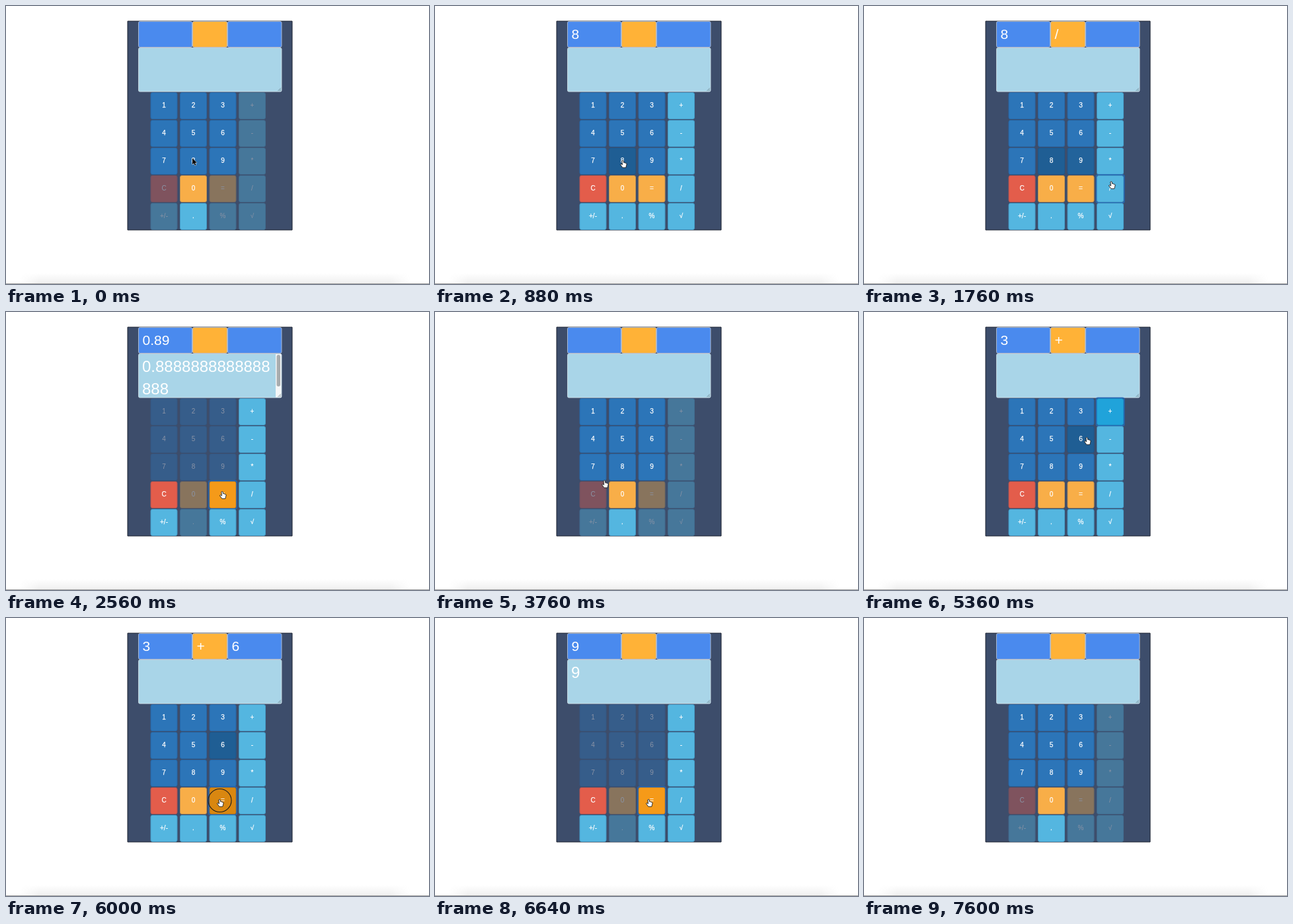
Recreate the animation shown at these times as an HTML page with a canvas. Size 640 px wide and 422 px high, loop 7680 ms.

```html
<!DOCTYPE html>
<html lang="en">
<head>
<meta charset="utf-8">
<title>Calculator</title>
<style>
html, body { margin: 0; width: 100%; height: 100%; overflow: hidden; background: #fff; }
canvas { display: block; width: 640px; height: 422px; }
</style>
</head>
<body>
<canvas id="stage"></canvas>
<script>
const LOOP = 7680;
const FONT = '"Liberation Sans", Arial, sans-serif';
const canvas = document.getElementById('stage');
const ratio = window.devicePixelRatio || 1;
canvas.width = 640 * ratio;
canvas.height = 422 * ratio;
const ctx = canvas.getContext('2d');

const PANEL = [61, 77, 107];
const STYLES = {
  digit: { base: [44, 117, 184], dark: [31, 94, 148], active: [26, 80, 128] },
  info: { base: [84, 182, 224], dark: [32, 163, 218], active: [26, 140, 190] },
  warm: { base: [248, 174, 72], dark: [245, 154, 25], active: [217, 135, 16] },
  danger: { base: [227, 93, 75], dark: [206, 70, 50], active: [180, 58, 42] }
};

const ROWS = ['1 2 3 +', '4 5 6 -', '7 8 9 *', 'C 0 = /', '+/- . % √'];
const keys = ROWS.flatMap((row, r) => row.split(' ').map((label, c) => ({
  label, x: 218.5 + c * 44.5, y: 131 + r * 42, w: 41, h: 41, kind: kindOf(label)
})));

function kindOf(label) {
  if (label === 'C') return 'danger';
  if (label === '0' || label === '=') return 'warm';
  return /\d/.test(label) ? 'digit' : 'info';
}

// Pointer stops: time, x, y
const PATH = [
  [0, 282, 231], [160, 282, 231], [600, 284, 234], [1240, 284, 234],
  [1720, 374, 266], [1780, 374, 266], [2040, 332, 238], [2120, 332, 238],
  [2300, 327, 272], [2880, 327, 272], [3360, 238, 274], [3640, 238, 274],
  [4100, 344, 166], [4360, 344, 166], [4480, 336, 156], [4600, 336, 156],
  [4820, 371, 152], [4920, 371, 152], [5120, 337, 190], [5540, 337, 190],
  [5800, 323, 275], [6640, 323, 275], [7040, 238, 274], [7680, 238, 274]
];
const HIDE_AT = 7520;

const PRESSES = [
  [640, '8'], [1640, '/'], [2060, '9'], [2400, '='], [3440, 'C'],
  [4520, '3'], [4860, '+'], [5440, '6'], [5960, '='], [7120, 'C']
];
const HOLD = 100;

const mix = (a, b, k) => a.map((v, i) => v + (b[i] - v) * k);
const rgb = c => `rgb(${c.map(Math.round).join(',')})`;

function pointer(t) {
  let i = 0;
  while (i < PATH.length - 2 && PATH[i + 1][0] <= t) i++;
  const [t0, x0, y0] = PATH[i], [t1, x1, y1] = PATH[i + 1];
  const u = Math.min(1, Math.max(0, (t - t0) / (t1 - t0)));
  const k = u * u * (3 - 2 * u);
  return { x: x0 + (x1 - x0) * k, y: y0 + (y1 - y0) * k };
}

function keyAt(p) {
  return keys.find(k => p.x >= k.x && p.x <= k.x + k.w && p.y >= k.y && p.y <= k.y + k.h);
}

function compute(a, op, b) {
  return op === '/' ? a / b : +a + +b;
}

function stateAt(t) {
  const s = { a: '', op: '', b: '', out: '', mode: 'start' };
  for (const [at, key] of PRESSES) {
    if (t < at + HOLD) break;
    if (key === 'C') {
      Object.assign(s, { a: '', op: '', b: '', out: '', mode: 'start' });
    } else if (key === '=') {
      const value = compute(s.a, s.op, s.b);
      Object.assign(s, { a: String(+value.toFixed(2)), op: '', b: '', out: String(value), mode: 'done' });
    } else if (/\d/.test(key)) {
      s[s.op ? 'b' : 'a'] += key;
      s.mode = 'entry';
    } else {
      s.op = key;
    }
  }
  return s;
}

function enabled(key, mode) {
  const numeric = /^[\d.]$/.test(key.label);
  if (mode === 'start') return numeric;
  return mode === 'entry' || !numeric;
}

function focusAt(t) {
  let label = '';
  for (const [at, key] of PRESSES) if (t >= at) label = key;
  return label;
}

// Hover and focus shades fade in shortly after they begin
function shade(key, t) {
  let sum = 0;
  for (let d = 200; d <= 280; d += 20) {
    const then = t - d;
    if (then >= 0 && (keyAt(pointer(then)) === key || focusAt(then) === key.label)) sum++;
  }
  return sum / 5;
}

function box(x, y, w, h, r, fill, stroke, width = 1) {
  ctx.beginPath();
  ctx.roundRect(x, y, w, h, r);
  if (fill) {
    ctx.fillStyle = fill;
    ctx.fill();
  }
  if (stroke) {
    ctx.strokeStyle = stroke;
    ctx.lineWidth = width;
    ctx.stroke();
  }
}

function text(str, x, y, size, color = '#fff', align = 'left') {
  ctx.font = `${size}px ${FONT}`;
  ctx.textAlign = align;
  ctx.fillStyle = color;
  ctx.fillText(str, x, y);
}

function drawPage() {
  ctx.fillStyle = '#fff';
  ctx.fillRect(0, 0, 640, 422);
  for (let i = 0; i < 16; i++) {
    const g = ctx.createLinearGradient(20, 0, 612, 0);
    const tone = `rgba(90,90,90,${0.006 * i})`;
    g.addColorStop(0, 'rgba(90,90,90,0)');
    g.addColorStop(0.05, tone);
    g.addColorStop(0.95, tone);
    g.addColorStop(1, 'rgba(90,90,90,0)');
    ctx.fillStyle = g;
    ctx.fillRect(20, 405 + i, 592, 1);
  }
  ctx.fillStyle = '#a0a0a0';
  ctx.fillRect(0, 421, 640, 1);
  box(184, 23, 249, 317, 0, rgb(PANEL));
  box(184, 23, 249, 317, 0, null, '#1c2231');
}

function drawFields(s) {
  const fields = [[200.5, 81, '#4a8aee', s.a], [282.5, 52, '#ffb237', s.op], [335.5, 81.5, '#4a8aee', s.b]];
  for (const [x, w, fill, value] of fields) {
    box(x, 23.5, w, 39, 2, fill, '#c3cbd8', 0.8);
    text(value, x + 6, 50, 21);
  }
  box(200.5, 63.5, 216.5, 66.5, 2, '#a9d5e8', '#d5e0e8', 0.8);
  text(s.out.slice(0, 15), 206, 91, 24);
  text(s.out.slice(15), 206, 125, 24);
  if (s.out.length > 15) {
    box(408, 64, 8.5, 59, 0, '#f4f6f7');
    box(409.5, 65, 5.5, 48, 2.7, '#a9adaf');
    box(408, 123, 8.5, 6.5, 0, '#f4f6f7');
  }
  ctx.strokeStyle = '#667b86';
  ctx.lineWidth = 0.8;
  ctx.beginPath();
  ctx.moveTo(411.5, 129);
  ctx.lineTo(416, 124.5);
  ctx.moveTo(414, 129);
  ctx.lineTo(416, 127);
  ctx.stroke();
}

function drawKey(key, s, t, press) {
  const { base, dark, active } = STYLES[key.kind];
  const on = enabled(key, s.mode);
  let fill = mix(base, dark, on ? shade(key, t) : 0);
  if (press && press[1] === key.label) fill = active;
  let ink = [255, 255, 255];
  let edge = mix(fill, [20, 60, 110], 0.25);
  if (!on) [fill, ink, edge] = [fill, ink, edge].map(c => mix(PANEL, c, 0.4));
  box(key.x + 0.5, key.y + 0.5, key.w - 1, key.h - 1, 2.5, rgb(fill), rgb(edge), 1);
  if (on && focusAt(t) === key.label && !/\d/.test(key.label)) {
    box(key.x - 0.7, key.y - 0.7, key.w + 1.4, key.h + 1.4, 2.5, null, '#2467b4', 1.4);
  }
  const x = key.x + key.w / 2;
  const y = key.y + 23;
  text(key.label, x, y, 10, rgb(ink), 'center');
  if (on) {
    ctx.strokeStyle = rgb(ink);
    ctx.lineWidth = 0.25;
    ctx.strokeText(key.label, x, y);
  }
}

const ARROW = new Path2D('M0 0V9.5L2.2 7.5L3.8 11L5.4 10.3L3.9 7H7Z');
const HAND = new Path2D('M-1 1Q0-.8 1 1L1.6 4Q2.5 3.2 3.2 4.3Q4.2 3.7 4.7 4.9Q6 4.6 5.9 6.2L5.2 9.6L4.6 11.2H-.2L-2.7 7.7Q-3.8 6.2-2.6 5.8L-.4 7Z');

function drawPointer(p, hand) {
  ctx.save();
  ctx.translate(p.x, p.y);
  ctx.lineJoin = 'round';
  ctx.lineWidth = 1;
  ctx.fillStyle = hand ? '#fff' : '#000';
  ctx.strokeStyle = hand ? '#111' : '#fff';
  const shape = hand ? HAND : ARROW;
  ctx.stroke(shape);
  ctx.fill(shape);
  if (hand) {
    ctx.lineWidth = 0.6;
    ctx.stroke(shape);
  }
  ctx.restore();
}

function drawRing(p) {
  ctx.beginPath();
  ctx.arc(p.x + 0.5, p.y + 2, 17.5, 0, Math.PI * 2);
  ctx.strokeStyle = '#1b1b1b';
  ctx.lineWidth = 1.1;
  ctx.stroke();
}

function draw(t) {
  const s = stateAt(t);
  const p = pointer(t);
  const over = keyAt(p);
  const press = PRESSES.find(([at]) => t >= at && t < at + HOLD);
  ctx.setTransform(ratio, 0, 0, ratio, 0, 0);
  drawPage();
  drawFields(s);
  keys.forEach(key => drawKey(key, s, t, press));
  if (press) drawRing(p);
  if (t < HIDE_AT) drawPointer(p, t > 120 && over && enabled(over, s.mode));
}

const start = performance.now();
function tick() {
  draw((performance.now() - start) % LOOP);
  requestAnimationFrame(tick);
}
tick();
</script>
</body>
</html>
```
